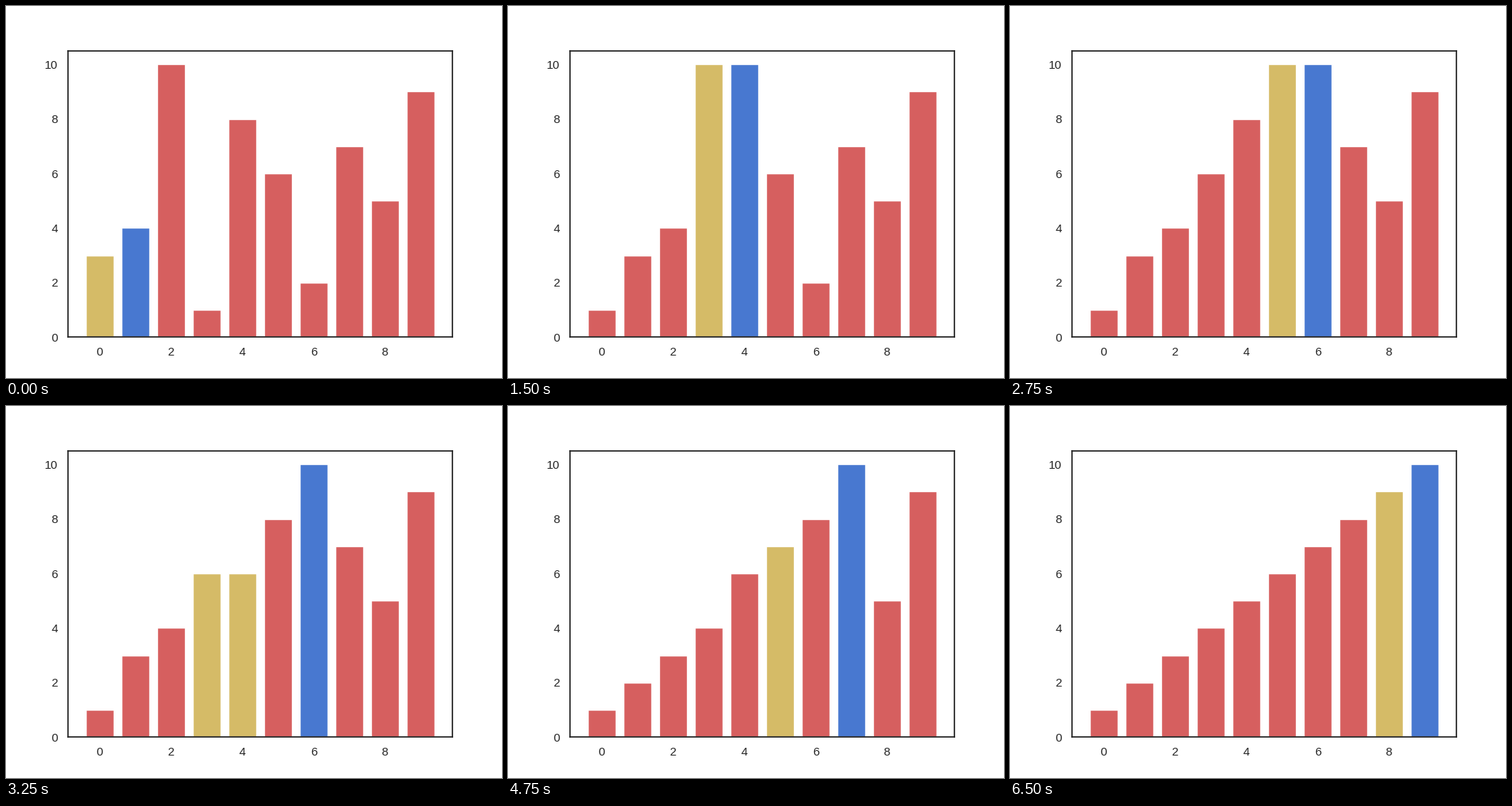
Animation of 640x480 px, one loop 6.75 s. Source, as a matplotlib script:

```python
import matplotlib.pyplot as plt
from matplotlib.animation import FuncAnimation

VALUES = [3, 4, 10, 1, 8, 6, 2, 7, 5, 9]
RED, BLUE, YELLOW, INK = "#D65F5F", "#4878D0", "#D5BB67", "#262626"

plt.rcParams.update({
    "font.family": "Liberation Sans",
    "font.size": 12,
    "axes.edgecolor": INK,
    "axes.linewidth": 1.25,
    "text.color": INK,
    "xtick.color": INK,
    "ytick.color": INK,
    "xtick.labelsize": 11,
    "ytick.labelsize": 11,
    "xtick.major.size": 6,
    "ytick.major.size": 6,
    "xtick.bottom": False,
    "ytick.left": False,
})


def insertion_sort(values):
    """Yield (heights, yellow bars, blue bar) after each shift and insertion."""
    a = list(values)
    for i in range(1, len(a)):
        key, hole = a[i], i
        while hole > 0 and a[hole - 1] > key:
            a[hole] = a[hole - 1]
            hole -= 1
            yield a[:], (hole, hole + 1), i
        a[hole] = key
        yield a[:], (min(hole, i - 1),), i


steps = list(insertion_sort(VALUES))

fig, ax = plt.subplots(figsize=(6.4, 4.8), dpi=100)
bars = ax.bar(range(len(VALUES)), VALUES, color=RED, edgecolor="white", linewidth=1)
ax.set_ylim(0, 10.5)
ax.set_xticks(range(0, 10, 2))
ax.set_yticks(range(0, 11, 2))


def draw(frame):
    heights, yellow, blue = steps[frame]
    for k, (bar, height) in enumerate(zip(bars, heights)):
        bar.set_height(height)
        bar.set_facecolor(BLUE if k == blue else YELLOW if k in yellow else RED)
    return list(bars)


anim = FuncAnimation(fig, draw, frames=len(steps), interval=250,
                     repeat=True, repeat_delay=0)
plt.show()
```
